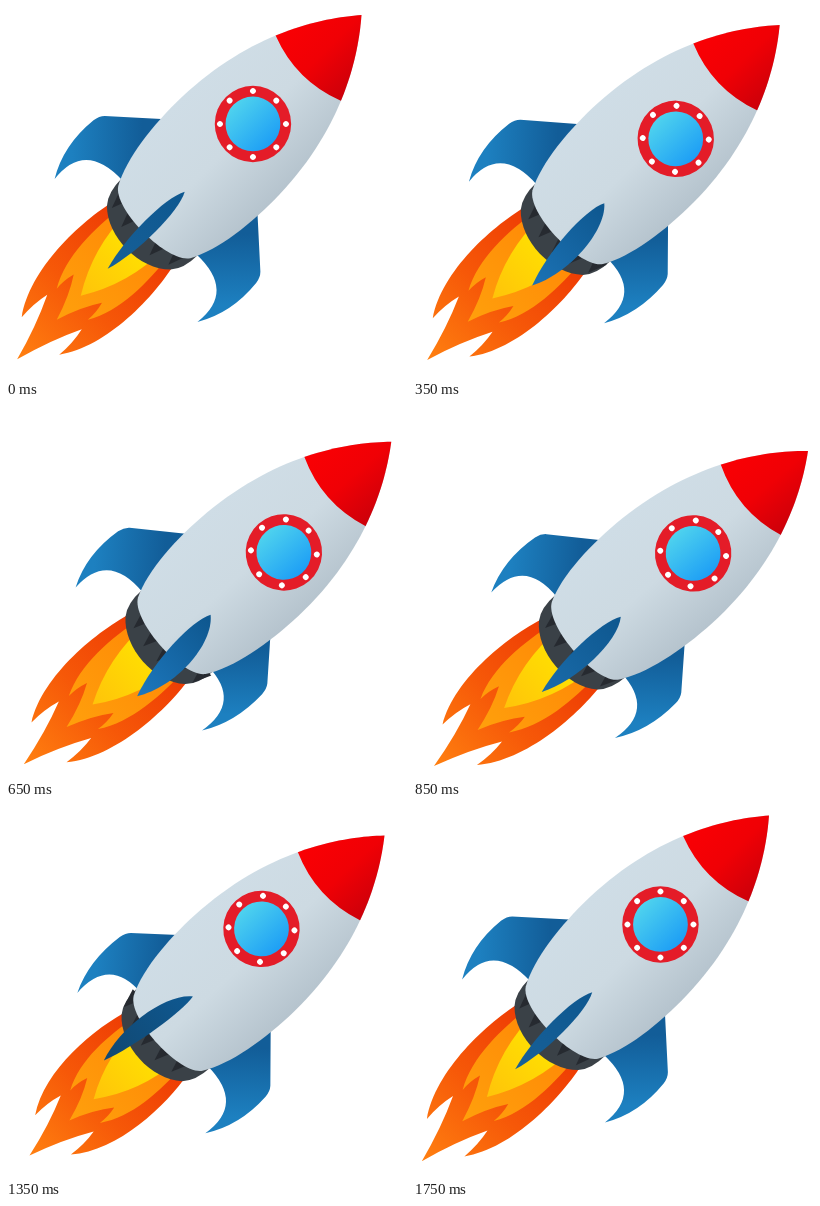
Animation, 401 px wide and 372 px high, one loop 1800 ms. Source, as an HTML page with a canvas:

```html
<!DOCTYPE html>
<html>
<head>
<meta charset="utf-8">
<style>
html, body { margin: 0; width: 401px; height: 372px; overflow: hidden; background: #fff; }
canvas { display: block; }
</style>
</head>
<body>
<canvas id="stage" width="401" height="372"></canvas>
<script>
const c = document.getElementById('stage').getContext('2d');
const LOOP = 1800, STEP = 50;
const times = [0, 200, 500, 850, 1100, 1350, 1750];

// Smooth periodic curve through one value per key time.
function track(...values) {
  const n = times.length;
  const time = i => times[(i + n) % n] + LOOP * Math.floor(i / n);
  const value = i => values[(i + n) % n];
  const slope = i => (value(i + 1) - value(i - 1)) / (time(i + 1) - time(i - 1));
  return t => {
    let i = n - 1;
    while (times[i] > t) i--;
    const d = time(i + 1) - time(i), s = (t - time(i)) / d, r = 1 - s;
    return r * r * ((1 + 2 * s) * value(i) + s * d * slope(i)) +
           s * s * ((3 - 2 * s) * value(i + 1) - r * d * slope(i + 1));
  };
}

const noseX = track(355.5, 358.5, 376, 395, 391.5, 378.5, 356);
const noseY = track(9, 12, 27, 45, 41, 29.5, 9.5);
const tilt = track(0, .3, 2.5, 4.6, 4.6, 2.6, 0);
const portShift = track(.3, 4, 15, 3.5, -7.6, -14, .3);
const finShift = track(0, 6, 26, 11, -4.6, -23, 0);
const leftSpan = track(1, 1, 1, .965, .9, .9, 1);
const rightSpan = track(1, .98, .9, .925, .985, .98, 1);
const flameLength = track(487, 486, 487, 489, 473, 478, 490);
const flameSway = track(0, -1, -1, -2.5, .5, -3, -1);

function gradient(x0, y0, x1, y1, ...colors) {
  const g = c.createLinearGradient(x0, y0, x1, y1);
  colors.forEach((color, i) => g.addColorStop(i / (colors.length - 1), color));
  return g;
}

function shape(path, fill) {
  c.fillStyle = fill;
  c.fill(path instanceof Path2D ? path : new Path2D(path));
}

function disc(x, y, r, fill) {
  c.beginPath();
  c.arc(x, y, r, 0, 2 * Math.PI);
  c.fillStyle = fill;
  c.fill();
}

// Rocket space: nose at the origin, tail along negative x.
const body = new Path2D(`M0 0C-30 -26 -90 -66 -185 -69C-225 -70 -268 -65 -293 -51
  C-313 -38 -313 38 -293 51C-268 65 -225 70 -185 69C-90 66 -30 26 0 0Z`);
const sideFin = new Path2D(`M-333 -101Q-303 -119 -264 -115Q-257 -114 -253 -110
  L-215 -68L-250 -40L-286 -52Q-284 -107 -333 -101Z`);
const flames = [
  [`M-305 -43C-345 -53 -415 -55 -454 -26.5Q-436 -28 -420 -24.4Q-450 -10 -487 0
    Q-450 10 -420 24.4Q-436 28 -454 26.5C-415 55 -345 53 -305 43Z`,
    gradient(-310, 0, -487, 0, '#ee3c04', '#f65808', '#ff8010')],
  [`M-305 -34C-340 -38 -380 -39 -409 -22Q-398 -23 -387 -20Q-405 -8 -431 0
    Q-405 8 -387 20Q-398 23 -409 22C-380 39 -340 38 -305 34Z`,
    gradient(-310, 0, -431, 0, '#ff8a06', '#ffa00c')],
  ['M-305 -26Q-355 -26 -397 0Q-355 26 -305 26Z',
    gradient(-310, 0, -397, 0, '#ffe400', '#ffc30a')]
].map(([d, fill]) => [new Path2D(d), fill]);

function drawFlame(t) {
  c.save();
  c.translate(-310, 0);
  c.transform((flameLength(t) - 310) / 177, -flameSway(t) / 177, 0, 1, 0, 0);
  c.translate(310, 0);
  for (const [path, fill] of flames) shape(path, fill);
  c.restore();
}

function drawSideFin(span) {
  c.save();
  c.scale(1, span);
  shape(sideFin, gradient(-300, -110, -250, -60, '#1d80c0', '#125d98'));
  c.restore();
}

function drawBand(shift) {
  shape('M-285 -54Q-305 -54 -315 -45C-337 -23 -337 23 -315 45Q-305 54 -285 54Z', '#3a4147');
  for (let i = -2; i <= 2; i++) {
    const y = i * 20 + shift * .4, x = -309 + y * y / 180;
    shape(`M${x + 6} ${y - 7}L${x - 13} ${y}L${x + 6} ${y + 7}Z`, '#262a30');
  }
}

function drawBody() {
  shape(body, gradient(0, -70, 0, 70, '#cfdde6', '#cddae2', '#b5c3cd'));
  c.save();
  c.clip(body);
  shape('M-75.3 -46Q-93 0 -75.3 46L-70 70H10V-70H-70Z',
    gradient(0, -46, 0, 46, '#fa0004', '#f00005', '#cc000a'));
  c.restore();
}

function drawPorthole(y) {
  c.save();
  c.translate(-153.8, y);
  disc(0, 0, 38.2, '#e41c28');
  disc(0, 0, 27.4, gradient(0, -27, 0, 27, '#4ed2ee', '#1e9ff5'));
  for (let i = 0; i < 8; i++) {
    const a = i * Math.PI / 4;
    disc(33 * Math.cos(a), 33 * Math.sin(a), 2.9, '#fff');
  }
  c.restore();
}

function drawMiddleFin(shift) {
  const top = shift * .45, h = 10 + .1 * shift + .2 * Math.abs(shift);
  const near = shift * .81, far = shift * 1.08;
  shape(`M-250 ${top}C-268 ${near - h} -325 ${far - h} -359 ${shift}
    C-325 ${far + h} -268 ${near + h} -250 ${top}Z`,
    gradient(-255, 0, -350, 0, 'hsl(206 82% 31%)', `hsl(206 74% ${34 + shift * .35}%)`));
}

function draw(now) {
  const t = Math.floor(now % LOOP / STEP) * STEP;
  c.setTransform(1, 0, 0, 1, 0, 0);
  c.fillStyle = '#fff';
  c.fillRect(0, 0, 401, 372);
  c.translate(noseX(t), noseY(t));
  c.rotate((tilt(t) - 45) * Math.PI / 180);
  drawFlame(t);
  drawSideFin(leftSpan(t));
  drawSideFin(-rightSpan(t));
  drawBand(finShift(t));
  drawBody();
  drawPorthole(portShift(t));
  drawMiddleFin(finShift(t));
}

const start = performance.now();
function tick() {
  draw(performance.now() - start);
  requestAnimationFrame(tick);
}
tick();
</script>
</body>
</html>
```
